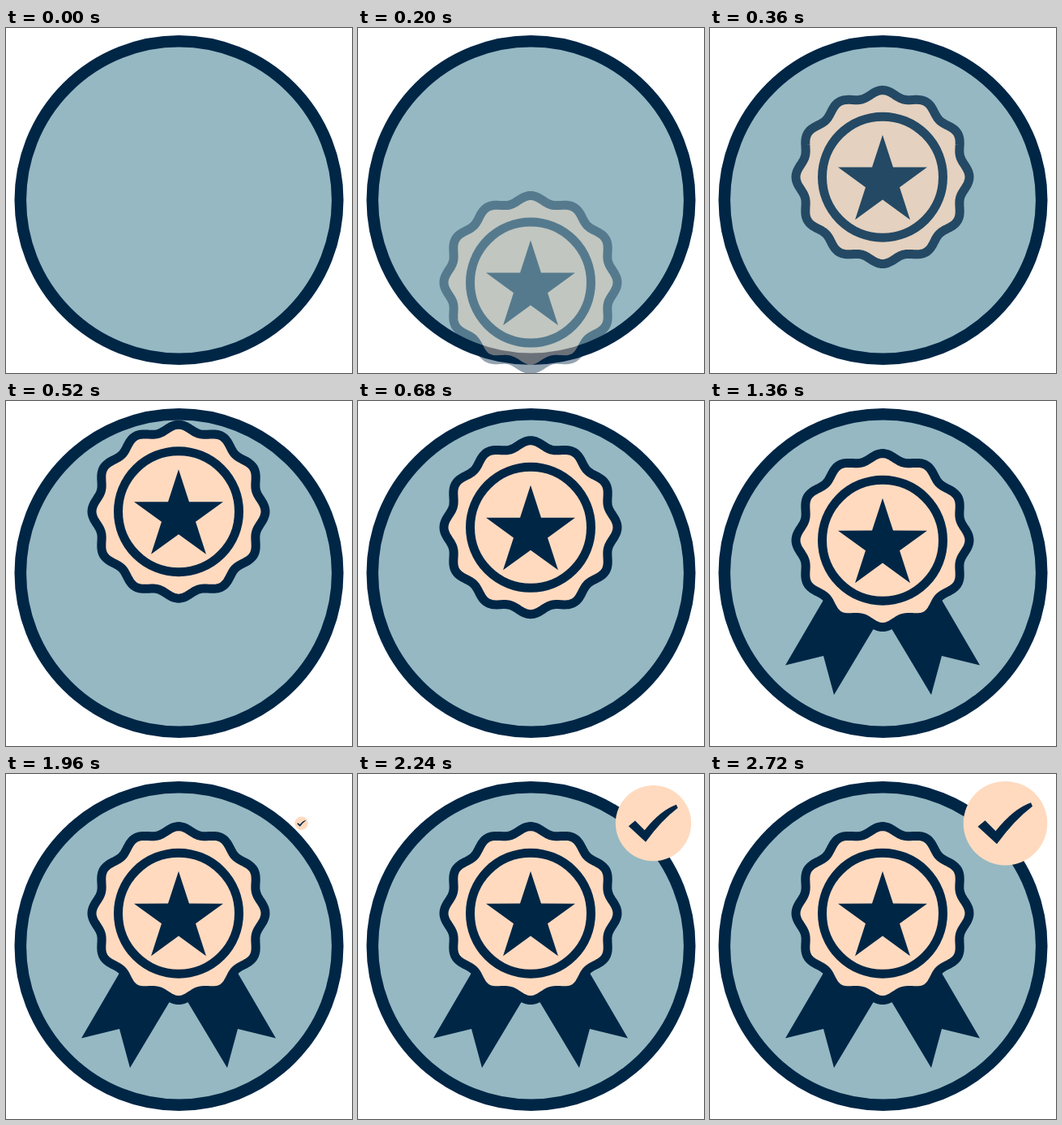
Write an HTML page that moves like this. It is 427 by 425 pixels and loops after 3840 ms.

```html
<!DOCTYPE html>
<html lang="en">
<head>
<meta charset="utf-8">
<title>Award badge</title>
<style>
  html, body { margin: 0; width: 100%; height: 100%; overflow: hidden; background: #fff; }
  svg { display: block; width: 100vw; height: 100vh; }
</style>
</head>
<body>
<svg viewBox="0 0 427 425" fill="#002646">
  <circle cx="213.5" cy="212" r="195.7" fill="#95b8c2" stroke="#002646" stroke-width="14.6"/>
  <g id="ribbons">
    <path id="ribbon" d="M93 325.5 140 314 153 362 213 262 160 211Z"/>
    <use href="#ribbon" transform="matrix(-1 0 0 1 426 0)"/>
  </g>
  <g id="badge">
    <g fill="#ffdabf" stroke="#002646" stroke-width="11">
      <path id="seal"/>
      <circle cx="213" cy="171.7" r="74.5"/>
    </g>
    <path id="star"/>
  </g>
  <g id="check">
    <circle r="51.8" fill="#ffdabf"/>
    <path d="M-34 4 -25-3.5-12 9.5Q10-18 31.5-25.5L33.5-21Q11-4-10.5 25.5Z"/>
  </g>
</svg>
<script>
  const LOOP = 3840;
  const el = id => document.getElementById(id);
  const clamp = x => Math.min(1, Math.max(0, x));
  const easeOut = x => 1 - (1 - x) ** 2;
  const mix = (a, b, x) => a + (b - a) * x;

  // Closed polygon around (213, cy) with a radius given per vertex
  function polar(cy, count, radius) {
    const points = Array.from({ length: count }, (_, i) => {
      const a = i / count * 2 * Math.PI, r = radius(a, i);
      return `${(213 + r * Math.sin(a)).toFixed(2)} ${(cy - r * Math.cos(a)).toFixed(2)}`;
    });
    return `M${points.join("L")}Z`;
  }
  el("seal").setAttribute("d", polar(171.6, 360, a => 103 + 4 * Math.cos(12 * a)));
  el("star").setAttribute("d", polar(177.5, 10, (a, i) => i % 2 ? 22.1 : 57.8));

  // Decelerate past the rest value, then settle back: 800 ms in total
  function overshoot(t, from, peak, rest) {
    const rise = 533;
    return t < rise
      ? mix(from, peak, easeOut(clamp(t / rise)))
      : mix(peak, rest, clamp((t - rise) / (800 - rise)));
  }

  function place(id, transform, opacity) {
    el(id).setAttribute("transform", transform);
    el(id).setAttribute("opacity", opacity);
  }

  function draw(t) {
    place("badge", `translate(0 ${overshoot(t, 422, -35.7, 0)})`, clamp(t / 480));
    const drop = clamp((t - 1000) / 360);
    place("ribbons", `translate(0 ${mix(-106, 0, easeOut(drop))})`, clamp(drop * 1.5));
    const scale = overshoot(t - 1920, 0, 1.07, 1);
    place("check", `translate(364.5 60.7) scale(${scale})`, t > 1920 ? 1 : 0);
  }

  function tick() {
    draw(performance.now() % LOOP);
    requestAnimationFrame(tick);
  }
  tick();
</script>
</body>
</html>
```
